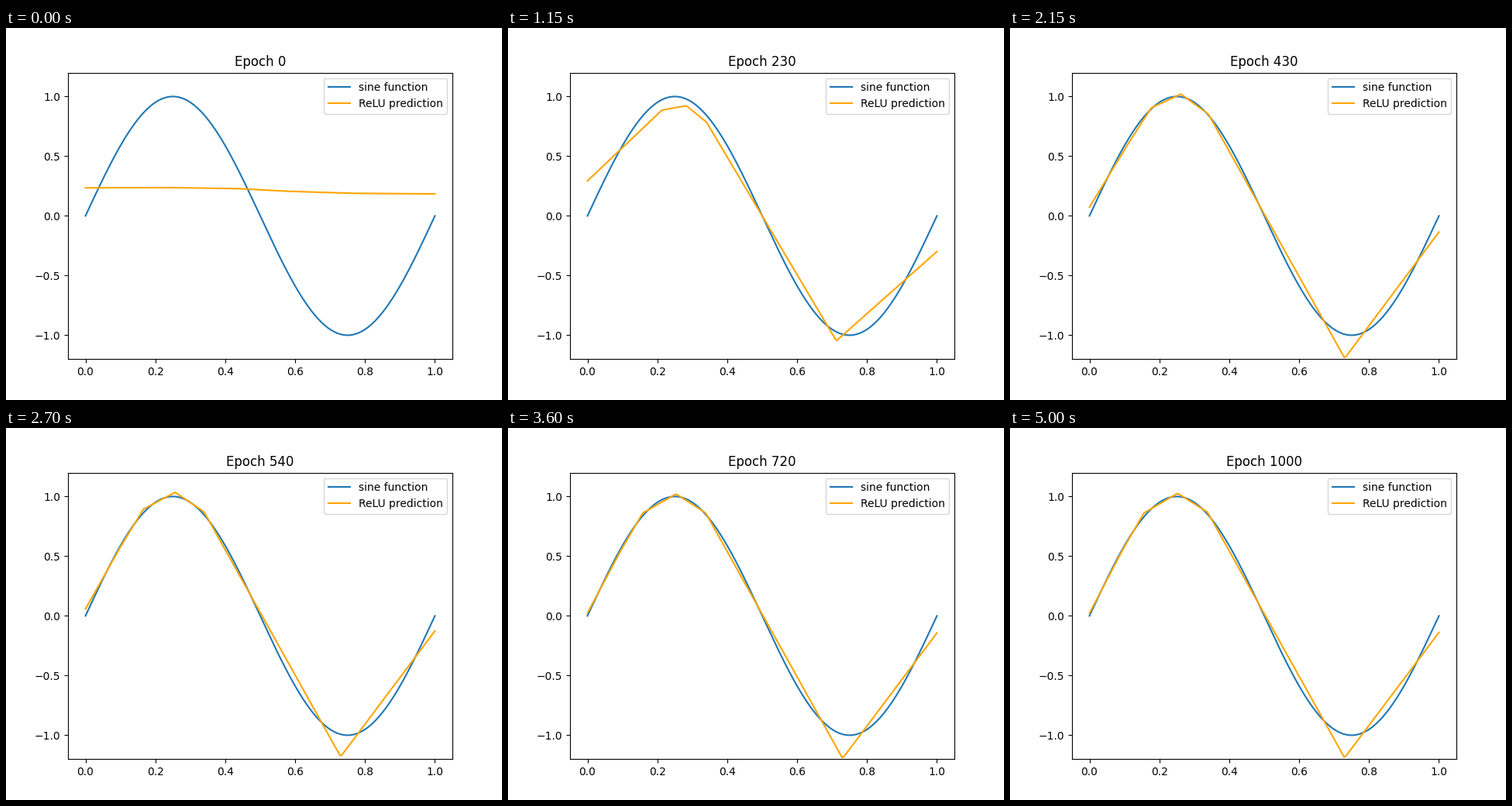
A matplotlib script that plays this animation: 640 by 480 pixels, repeating every 5050 ms.

```python
import numpy as np
import matplotlib.pyplot as plt
from matplotlib.animation import FuncAnimation

FRAMES = 101
STEP = 10  # epochs per frame
BEND, FIT = 140, 320  # epochs at which the curve is bent, then close to the sine

# Stages of the fit: four inner knot positions, then heights at x=0, knots, x=1
FLAT = np.array([.24, .44, .57, .76, .235, .237, .228, .207, .189, .184])
BENT = np.array([.25, .316, .334, .656, .782, .681, .655, .636, -.594, -.797])
CLOSE = np.array([.201, .272, .343, .731, .130, .955, 1.012, .834, -1.198, -.133])
FINAL = np.array([.155, .252, .338, .730, .026, .865, 1.032, .874, -1.184, -.134])

x = np.linspace(0, 1, 200)


def mix(a, b, s):
    return a + (b - a) * s


def prediction(epoch):
    tilt = shift = bow = 0
    if epoch < BEND:
        t = epoch / BEND
        pose = mix(FLAT, BENT, t * t * (3 - 2 * t))
        tilt = .6 * np.sin(np.pi * t * t)
    elif epoch < FIT:
        t = (epoch - BEND) / (FIT - BEND)
        pose = mix(BENT, CLOSE, 1 - (1 - t) ** 2)
    else:
        s = 1 - np.exp((FIT - epoch) / 150)
        pose = mix(CLOSE, FINAL, s)
        shift = .01 * s * np.cos(2 * np.pi * (epoch - 540) / 345)
        bow = .02 * s
    knots, heights = [0, *pose[:4], 1], pose[4:]
    y = np.interp(x, knots, heights) + tilt * (.5 - x) + shift
    # a small extra hinge on the first rise
    return y + np.interp(x, [0, .6 * knots[1], knots[1]], [0, bow, 0])


fig, ax = plt.subplots(figsize=(6.4, 4.8), dpi=100)
ax.plot(x, np.sin(2 * np.pi * x), label="sine function")
line, = ax.plot(x, prediction(0), color="orange", label="ReLU prediction")
ax.set_ylim(-1.2, 1.2)
ax.legend(loc="upper right")
title = ax.set_title("Epoch 0")


def update(i):
    epoch = i * STEP
    line.set_ydata(prediction(epoch))
    title.set_text(f"Epoch {epoch}")
    return line, title


anim = FuncAnimation(fig, update, frames=FRAMES, interval=50, repeat=True,
                     repeat_delay=0, blit=False)
plt.show()
```
